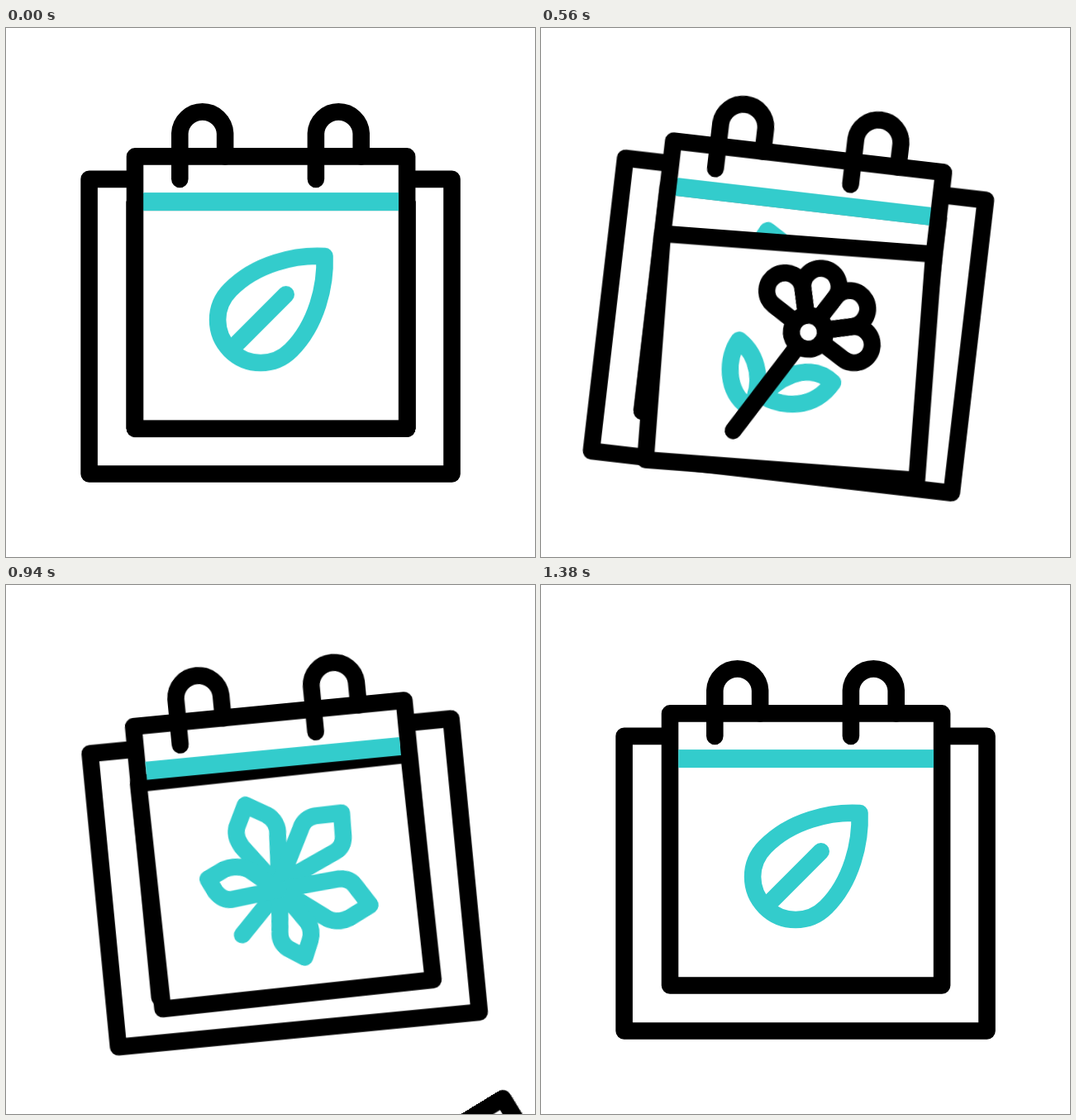
An HTML page that plays this animation: 640x640 px, repeating every 2.4 s.

```html
<!DOCTYPE html>
<html lang="en">
<head>
<meta charset="utf-8">
<title>Calendar pages</title>
<style>
html, body { margin: 0; width: 100%; height: 100%; overflow: hidden; background: #fff; }
svg { display: block; width: 100%; height: 100%; }

.line, .teal {
  fill: none;
  stroke: #000;
  stroke-width: 20.57;
  stroke-linecap: round;
  stroke-linejoin: round;
}
.teal { stroke: #3cc; }
.paper { fill: #fff; }

.calendar, .page, .drop, .tilt { animation: 2400ms linear var(--wait, 0ms) infinite; }

.calendar { transform-origin: 320px 182.86px; animation-name: swing; }
.page { animation-name: drift, leave; animation-timing-function: linear, step-end; }
.drop { animation-name: drop; }
.tilt { transform-origin: 320.55px 347.4px; animation-name: tilt; }

@keyframes swing {
  0%, 0.58% { transform: rotate(0); animation-timing-function: cubic-bezier(.333, 0, .667, 1); }
  13.17% { transform: rotate(-6.3deg); animation-timing-function: cubic-bezier(.333, 0, .667, 1); }
  28.05% { transform: rotate(10.6deg); animation-timing-function: cubic-bezier(.333, 0, .667, 1); }
  40.46% { transform: rotate(-6deg); animation-timing-function: cubic-bezier(.333, 0, .667, 1); }
  51.33%, 100% { transform: rotate(0); }
}

/* A page falls for 480 ms, stays away, then returns under the pages above it. */
@keyframes drift {
  0% { transform: translateX(0); animation-timing-function: cubic-bezier(.333, .002, .667, .256); }
  20%, 61.9% { transform: translateX(150px); }
  62%, 100% { transform: translateX(0); }
}
@keyframes drop {
  0% { transform: translateY(0); animation-timing-function: cubic-bezier(.333, .042, .667, .785); }
  20%, 61.9% { transform: translateY(495px); }
  62%, 100% { transform: translateY(0); }
}
@keyframes tilt {
  0% { transform: rotate(0); animation-timing-function: cubic-bezier(.333, .057, .667, .584); }
  20%, 61.9% { transform: rotate(-26deg); }
  62%, 100% { transform: rotate(0); }
}
@keyframes leave {
  0% { opacity: 1; }
  20% { opacity: 0; }
  62%, 100% { opacity: 1; }
}
</style>
</head>
<body>
<svg viewBox="0 0 640 640">
  <defs>
    <rect id="sheet" class="line" x="156" y="210.3" width="329.1" height="274.2" style="fill:#fff"/>

    <path id="leaf" class="teal" d="M385.5 276C350 274 302 285 271.3 316.7C251 337 251 369 271.3 389.7
      C291.6 410 324.5 410 344.8 389.7C376 358.5 387 311 385.5 276ZM271.3 389.7L338.7 322.3"/>

    <path id="petal" class="line" d="M-7.9-19L-20.2-48.9A21.9 21.9 0 1 1 20.2-48.9L7.9-19"/>

    <g id="flower" transform="translate(340.9 315.7) rotate(3.93)">
      <path class="teal" d="M-81.5 21.5C-94 45-89 85-59 100L-56 98C-45 70-55 37-81.5 21.5Z"/>
      <path class="teal" d="M38 56C12 38-18 50-41 80L-44 84C-18 95 20 92 38 56Z"/>
      <path class="line" d="M-73 131L-10 18"/>
      <use href="#petal" transform="rotate(-37.9)"/>
      <use href="#petal" transform="rotate(7.1)"/>
      <use href="#petal" transform="rotate(52.1)"/>
      <use href="#petal" transform="rotate(97.1)"/>
      <circle class="line" r="20.6" style="fill:#fff"/>
    </g>

    <g id="plant" class="teal" transform="rotate(-4.12 320 182.86)">
      <path d="M245.5 401L300 354"/>
      <path d="M300 354L264 296C261 289 258 282 262 272L277 247L300 263C308 269 312 280 309 290Z"/>
      <path d="M300 348L338 287C342 279 350 275 358 275L390 277L387 305C386 313 382 319 374 322Z"/>
      <path d="M300 355L370 355C378 355 386 358 390 366L404 393L376 404C366 407 355 405 347 397Z"/>
      <path d="M300 354L326 400C329 407 329 414 325 422L315 441L297 427C291 421 289 413 291 405Z"/>
      <path d="M298 355L268 325C258 318 248 317 238 319L216.5 327L223 344C227 351 232 356 240 356.5Z"/>
    </g>

    <path id="ring" class="line" d="M210.3 182.86V127.5A27.43 27.43 0 0 1 265.1 127.5V155.4"/>
  </defs>

  <g class="calendar">
    <rect class="line" x="100.6" y="182.86" width="438.9" height="356.6"/>
    <rect class="line" x="156" y="155.4" width="329.1" height="329.1" style="fill:#fff"/>
    <use href="#leaf"/>

    <g class="page" style="--wait:900ms"><g class="drop"><g class="tilt">
      <use href="#sheet"/><use href="#plant"/>
    </g></g></g>
    <g class="page" style="--wait:462.5ms"><g class="drop"><g class="tilt">
      <use href="#sheet"/><use href="#flower"/>
    </g></g></g>
    <g class="page"><g class="drop"><g class="tilt">
      <use href="#sheet"/><use href="#leaf"/>
    </g></g></g>

    <rect x="166.2" y="199.1" width="308.8" height="22" fill="#3cc"/>
    <use href="#ring"/>
    <use href="#ring" x="164.6"/>
  </g>
</svg>
</body>
</html>
```
